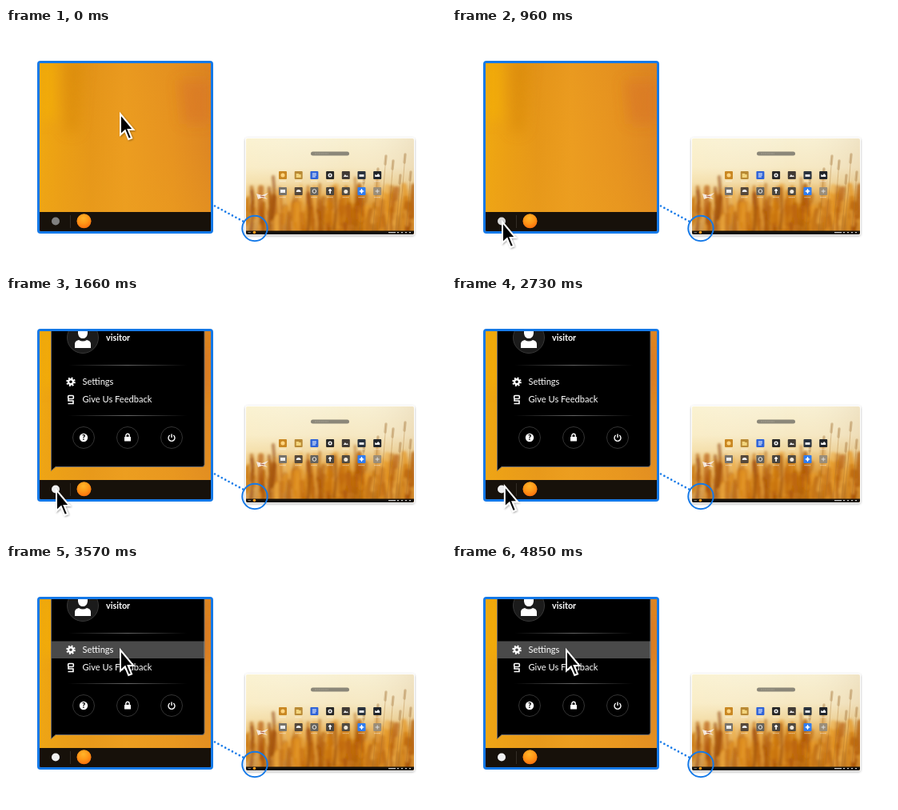
An HTML page that plays this animation: 550 px wide and 300 px high, repeating every 7080 ms.

```html
<!DOCTYPE html>
<html lang="en">
<head>
<meta charset="utf-8">
<title>Opening the settings menu</title>
<style>
  html, body { margin: 0; width: 100%; height: 100%; overflow: hidden; background: #fff; }
  svg { display: block; width: 550px; height: 300px; }
  text { font: 11.1px Lato, sans-serif; fill: #fff; }
  .name { font-size: 10.8px; font-weight: 700; }
  .mark { font-size: 9px; font-weight: 900; fill: #000; }
</style>
</head>
<body>
<svg viewBox="0 0 550 300">
  <defs>
    <linearGradient id="wall">
      <stop offset="0" stop-color="#f0a90f"/>
      <stop offset=".13" stop-color="#eb9f13"/>
      <stop offset=".3" stop-color="#e59618"/>
      <stop offset=".5" stop-color="#ec9d20"/>
      <stop offset=".78" stop-color="#e69220"/>
      <stop offset="1" stop-color="#dc8423"/>
    </linearGradient>
    <linearGradient id="warm" x2="0" y2="1">
      <stop offset="0" stop-color="#d5801a" stop-opacity=".12"/>
      <stop offset=".5" stop-color="#eb9d20" stop-opacity=".1"/>
      <stop offset="1" stop-color="#eda01e" stop-opacity=".5"/>
    </linearGradient>
    <radialGradient id="ball" cx=".45" cy=".3" r=".75">
      <stop offset="0" stop-color="#ffb52a"/>
      <stop offset=".5" stop-color="#ff9717"/>
      <stop offset="1" stop-color="#fb6a0a"/>
    </radialGradient>
    <linearGradient id="sky" x2="0" y2="1">
      <stop offset="0" stop-color="#f8f0d2"/>
      <stop offset=".3" stop-color="#f6e8c2"/>
      <stop offset=".46" stop-color="#f0d59a"/>
      <stop offset=".6" stop-color="#e5aa4c"/>
      <stop offset=".75" stop-color="#d58517"/>
      <stop offset="1" stop-color="#b4640a"/>
    </linearGradient>
    <linearGradient id="haze">
      <stop offset="0" stop-color="#fff6d0" stop-opacity=".35"/>
      <stop offset=".6" stop-color="#fff" stop-opacity="0"/>
      <stop offset="1" stop-color="#c9a988" stop-opacity=".18"/>
    </linearGradient>
    <linearGradient id="rule">
      <stop offset="0" stop-color="#fff" stop-opacity="0"/>
      <stop offset=".5" stop-color="#fff" stop-opacity=".4"/>
      <stop offset="1" stop-color="#fff" stop-opacity="0"/>
    </linearGradient>
    <filter id="shadow" x="-10%" y="-10%" width="120%" height="125%">
      <feDropShadow dx="0" dy="1" stdDeviation="1.5" flood-opacity=".3"/>
    </filter>
    <filter id="drop" x="-50%" y="-50%" width="200%" height="200%">
      <feDropShadow dx="1" dy="1" stdDeviation="1" flood-opacity=".35"/>
    </filter>
    <filter id="blur" x="-50%" y="-50%" width="200%" height="200%"><feGaussianBlur stdDeviation="8"/></filter>
    <filter id="soft"><feGaussianBlur stdDeviation="1.8"/></filter>
    <clipPath id="zoom"><rect x="42" y="44" width="214" height="210" rx="1"/></clipPath>
    <clipPath id="screen"><rect x="300" y="138" width="210" height="120" rx="2"/></clipPath>
  </defs>

  <!-- Desktop -->
  <rect x="299" y="137" width="212" height="122" rx="3" fill="#fff" filter="url(#shadow)"/>
  <g clip-path="url(#screen)">
    <rect x="300" y="138" width="210" height="120" fill="url(#sky)"/>
    <rect x="300" y="138" width="210" height="120" fill="url(#haze)"/>
    <g id="grass" fill="none" stroke-linecap="round" filter="url(#soft)"></g>
    <g id="stalks" fill="none" stroke-linecap="round"></g>
    <path d="M313 207l7 2 8-3-5 5 4 3-7-2-5 2z" fill="#f4e7dc"/>
    <path d="M318 210l5 1" stroke="#a44b29"/>
    <rect x="381" y="154.500" width="48" height="5" rx="2.500" fill="#8b8779"/>
    <path d="M386 157h17" stroke="#aaa596" stroke-width=".8" stroke-dasharray="2 .6"/>
    <g id="apps"></g>
    <rect x="300" y="253.500" width="210" height="4.500" fill="#15100a"/>
    <path d="M302.500 255.700h3.500" stroke="#8b8884"/>
    <circle cx="310.500" cy="255.500" r="1.800" fill="#ff9c18"/>
    <path d="M478 255.700h9m2 0h2m3 0h2m3 0h2m3 0h2" stroke="#ccc" stroke-width="1.300"/>
  </g>
  <path d="M261 222.500L297 242" stroke="#1479e8" stroke-width="2.600" stroke-linecap="round" stroke-dasharray="0 5"/>
  <circle cx="311" cy="250.500" r="15.700" fill="none" stroke="#1479e8" stroke-width="2"/>

  <!-- Magnified corner -->
  <rect x="40.500" y="42.500" width="217" height="213" rx="2.500" fill="#e0941a" stroke="#1479e8" stroke-width="3"/>
  <g clip-path="url(#zoom)">
    <rect x="42" y="44" width="214" height="210" fill="url(#wall)"/>
    <rect x="42" y="44" width="214" height="210" fill="url(#warm)"/>
    <g filter="url(#blur)">
      <path d="M72 40h26l-8 90h-16z" fill="#cf800f" opacity=".4"/>
      <path d="M215 65h40v55h-34z" fill="#d0602a" opacity=".3"/>
      <path d="M42 40h20v75H42z" fill="#f7b50c" opacity=".5"/>
    </g>
    <rect x="42" y="230" width="214" height="24" fill="#17110a"/>
    <path d="M80.500 234v16" stroke="#332d26"/>
    <circle cx="97.500" cy="241.300" r="9" fill="url(#ball)"/>

    <g id="menu">
      <path d="M56.500 40V218.500L62 213.500H245q3 0 3-3V40z" fill="#000" stroke="#6d6a68"/>
      <rect id="row" x="57" y="96.500" width="191" height="21.500" fill="#fff"/>
      <circle cx="96" cy="52" r="19.500" fill="#1b1b1b" stroke="#373737"/>
      <path d="M90 44q0-5 6-5t6 5v3q-1 6-6 6t-6-6z M86 65v-5q0-4 5-5 5 3 10 0 5 1 5 5v5z" fill="#fff"/>
      <text x="125" y="56" class="name">visitor</text>
      <rect x="78" y="86" width="148" height="1" fill="url(#rule)"/>
      <rect x="78" y="149" width="148" height="1" fill="url(#rule)"/>
      <text x="95.500" y="111">Settings</text>
      <text x="95.500" y="133">Give Us Feedback</text>
      <g fill="none" stroke="#fff">
        <circle cx="81" cy="107.300" r="3" stroke-width="2.400"/>
        <circle cx="81" cy="107.300" r="4.800" stroke-width="2" stroke-dasharray="1.900 1.870"/>
        <rect x="77.700" y="124.500" width="6.600" height="4" rx="1" stroke-width="1.600"/>
        <path d="M78 128.500v2.500h6v3.500h-6.500" stroke-width="1.600"/>
      </g>
      <g fill="#000" stroke="#343434">
        <circle cx="97" cy="177" r="13.500"/>
        <circle cx="152" cy="177" r="13.500"/>
        <circle cx="207" cy="177" r="13.500"/>
      </g>
      <circle cx="97" cy="177" r="5.200" fill="#fff"/>
      <text x="97" y="180.200" text-anchor="middle" class="mark">?</text>
      <rect x="148" y="176" width="8" height="5.500" rx=".6" fill="#fff"/>
      <path d="M149.800 176v-1.500a2.200 2.200 0 0 1 4.400 0v1.500M204.800 174a4 4 0 1 0 4.400 0M207 172.500v4.500" fill="none" stroke="#fff" stroke-width="1.400"/>
    </g>
  </g>
  <circle id="badge" cx="62" cy="241.500" r="5"/>

  <path id="cursor" d="M0 0V26L5.800 20.800L10.200 31.500L14 29.900L9.700 19.600H16.300Z"
        fill="#000" stroke="#fff" stroke-width="2" filter="url(#drop)"/>
</svg>

<script>
const LOOP = 7080, STEP = 30;
const $ = id => document.getElementById(id);
const clamp = x => Math.max(0, Math.min(1, x));
const mix = (a, b, p) => a + (b - a) * p;

let seed = 11;
const random = () => (seed = seed * 16807 % 2147483647) / 2147483647;

// Blurred tufts, higher towards the right, with a few sharper stalks in front.
function drawGrass() {
  const tones = ['#c46c08', '#e39320', '#a85208', '#efae45', '#b8600a'];
  let tufts = '', stalks = '';
  for (let i = 0; i < 150; i++) {
    const across = random(), x = 300 + across * 210, base = 226 + random() * 40;
    const height = 12 + random() * (20 + 14 * across), lean = random() * 8 - 4;
    tufts += `<path d="M${x} ${base}q0 ${-height / 2} ${lean} ${-height}" stroke="${tones[i % 5]}"
      stroke-width="${3 + random() * 5}" opacity="${0.3 + random() * 0.4}"/>`;
  }
  for (const [x, y] of [[334, 186], [329, 200], [307, 204], [378, 206], [411, 200]])
    tufts += `<path d="M${x} ${y}q3 25-1 52" stroke="#94480c" stroke-width="4" opacity=".6"/>`;
  for (const [x, y] of [[484, 166], [475, 160], [499, 158], [506, 180], [465, 176], [448, 184], [493, 184]])
    stalks += `<path d="M${x} ${y}q-3 45-8 90" stroke="#a8722c" stroke-width=".8" opacity=".45"/>
      <path d="M${x} ${y}l-1 10" stroke="#b48c58" stroke-width="3.500" opacity=".45"/>`;
  $('grass').innerHTML = tufts;
  $('stalks').innerHTML = stalks;
}

function drawApps() {
  const tiles = ['#c98722', '#b98a35', '#2f63d8', '#262626', '#403a35', '#29323e', '#20242a',
                 '#77736b', '#55483a', '#66635c', '#49443d', '#504a40', '#2f7cf0', '#9a8d78'];
  const glyphs = [
    '<circle r="2.500" fill="#ffd580"/>',
    '<path d="M-3-2h3l1 1h2v4h-6z" fill="#f3d57d"/>',
    '<path d="M-2.500-2h5m-5 2h5m-5 2h4" stroke="#fff"/>',
    '<circle r="2.600" fill="#eee"/><circle r="1" fill="#222"/>',
    '<path d="M-3 2l2-3 2 2 1-1 1 2z" fill="#eee"/>',
    '<path d="M-3-1h6v3h-6z" fill="#e8e8e8"/>',
    '<path d="M-3 2v-3l2 1 2-2 2 2v2z" fill="#f5f5f5"/>',
    '<path d="M-3-2h6v4h-6z" fill="#eee"/>',
    '<path d="M-3 1q0-3 3-3t3 3z" fill="#eee"/>',
    '<circle r="2.300" fill="none" stroke="#eee"/>',
    '<path d="M0-3v6M-2-1h4" stroke="#fff" stroke-width="1.600"/>',
    '<circle cy=".5" r="2.500" fill="#f0e9dc"/>',
    '<circle r="2" fill="#d8eaff"/><path d="M-3 0h6M0-3v6" stroke="#fff"/>',
    '<path d="M-2.500 0h5M0-2.500v5" stroke="#ddd"/>'
  ];
  $('apps').innerHTML = tiles.map((color, i) => {
    const x = 346 + i % 7 * 19.7, y = i < 7 ? 184 : 204;
    return `<g transform="translate(${x} ${y})"><rect x="-5" y="-5" width="10" height="10" rx="1" fill="${color}"/>
      ${glyphs[i]}<path d="M-4 7.700h8" stroke="#fff" stroke-width=".9" stroke-dasharray="1.500 .5" opacity=".65"/></g>`;
  }).join('');
}

// Dip that starts at the given time and lasts seven steps.
const press = (t, start) => Math.sin(Math.PI * clamp((t - start) / (7 * STEP)));

function draw(now) {
  const t = now % LOOP;
  const tick = Math.floor(t / STEP) * STEP;
  const down = clamp(tick / (31 * STEP));
  const up = clamp((tick - 2700) / (28 * STEP));
  const place = down - up;
  const scale = 1 - 0.1 * (press(t, 1360) + press(t, 4640));
  $('cursor').setAttribute('transform',
    `translate(${mix(143, 63, place)} ${mix(107.5, 242.5, place)}) scale(${scale})`);

  const fade = t < 1360 ? 0 : clamp((Math.floor((t - 1360) / STEP) + 1) / 11);
  $('menu').setAttribute('opacity', fade ** 3.5);
  const hover = clamp((tick - 3420) / (5 * STEP));
  $('row').setAttribute('opacity', 0.29 * hover + 0.12 * press(t, 4640));

  const glow = clamp((tick - 840) / (5 * STEP));
  const gray = Math.round(mix(128, 240, glow));
  $('badge').setAttribute('fill', `rgb(${gray},${gray},${gray})`);
}

function frame() {
  draw(performance.now());
  requestAnimationFrame(frame);
}

drawGrass();
drawApps();
frame();
</script>
</body>
</html>
```
